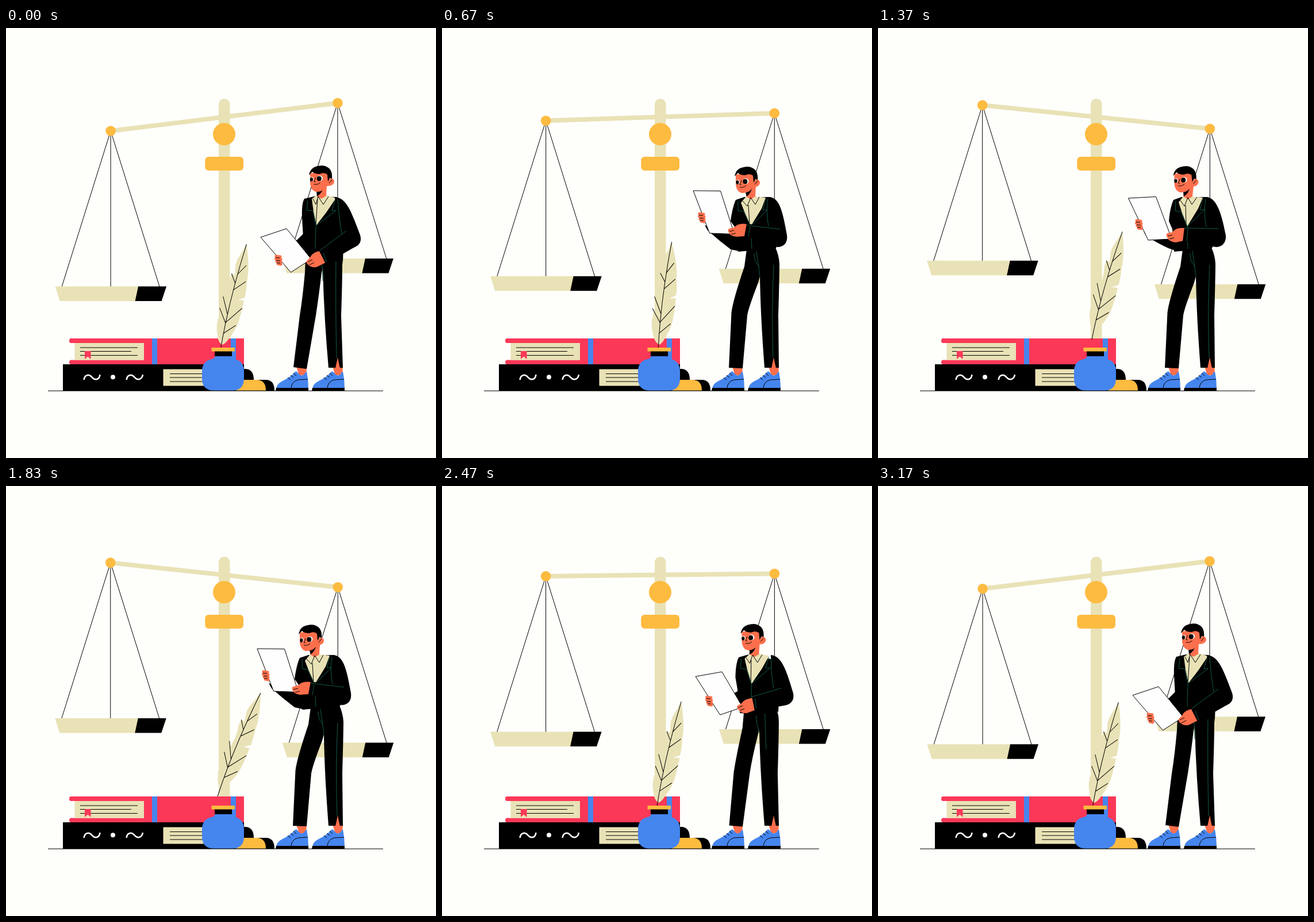
Write an HTML page that moves like this. It is 748 px wide and 748 px high and loops after 3210 ms.

```html
<!DOCTYPE html>
<html lang="en">
<head>
<meta charset="utf-8">
<title>Scales of justice</title>
<style>
html, body { margin: 0; width: 100%; height: 100%; overflow: hidden; background: #fefefb; }
svg { display: block; width: 100vw; height: 100vh; }
.cream { fill: #e9e2b6; }
.gold { fill: #fdbb40; }
.red { fill: #fb3857; }
.blue { fill: #4585ee; }
.skin { fill: #fc6f4c; }
.white { fill: #fefefe; }
.line { fill: none; stroke: #000; stroke-width: 1; }
.seam { fill: none; stroke: #115a48; stroke-width: 1; }
.fingers { fill: none; stroke: #fc6f4c; stroke-width: 5; stroke-linecap: round; }
.sheet { fill: #fefefe; stroke: #000; stroke-width: 1; }
</style>
</head>
<body>
<svg viewBox="0 0 748 748">
  <defs>
    <g id="pan">
      <path class="line" d="M0 0L-85 271M0 0V271M0 0L85 271"/>
      <path class="cream" d="M-96.5 270.5H50L44 296H-88.5Z"/>
      <path d="M48 270.5H97L88.5 296H42.5Z"/>
      <circle class="gold" r="8.8"/>
    </g>
    <g id="shoe">
      <path class="skin" d="M505 589H523L522 603L510 605Z"/>
      <path class="blue" d="M470 627Q471 619 481 614Q494 608 503 598Q505 596 508 600Q513 607 518 603L523 597Q526 612 526 627Z"/>
      <path d="M470 626H526V631H469Z"/>
      <path class="line" d="M496 626Q497 615 508 612L525 611M490 608L495 612M495 604L500 608M500 600L505 605"/>
    </g>
  </defs>

  <path class="line" d="M73 631.2H656"/>
  <rect class="cream" x="370" y="123" width="19.5" height="430" rx="9.7"/>
  <path id="beam" fill="none" stroke="#e9e2b6" stroke-width="8"/>
  <circle class="gold" cx="379.5" cy="184.7" r="19.5"/>
  <rect class="gold" x="346.3" y="224" width="66.7" height="24" rx="6"/>
  <use href="#pan" id="left"/>
  <use href="#pan" id="right"/>

  <!-- books -->
  <path class="red" d="M113 540H414V585H113Q110 585 110 581.5T113 577.5H240V548H113Q110 548 110 544T113 540Z"/>
  <path class="cream" d="M119.5 548H240V577.5H119.5Z"/>
  <path class="blue" d="M254 540h9v45h-9zM391 540h9v45h-9z"/>
  <path class="line" d="M129 556H229M129 562.5H218M129 569.5H229"/>
  <path class="red" d="M137 562H147.500V576L142.200 571.500L137 576Z"/>
  <path d="M99 585H414V593H417Q431 594 431 612H452Q467 612 467 631H99Z"/>
  <path class="cream" d="M273.500 593.500H360V622.500H273.500Z"/>
  <path class="line" d="M285 601.5H345M285 608H345M285 615H345"/>
  <path class="gold" d="M400 612H437Q452 613 452 630.500H400Z"/>
  <path fill="none" stroke="#fefefe" stroke-width="2.6" d="M135.500 612C137 602 145 602 149.500 607.500S162 613 163.500 603M209.500 612C211 602 219 602 223.500 607.500S236 613 238 603"/>
  <circle class="white" cx="186" cy="607.3" r="4"/>

  <g id="feather">
    <path class="cream" d="M0 -195Q16 -155 16 -133Q19 -118 19 -104L8 -97L19 -99Q20 -75 18 -56Q15 -40 9 -28Q5 -17 0 -15Q-8 -18 -11 -28Q-19 -45 -17 -60Q-17 -68 -14 -84Q-10 -100 -11.500 -119Q-15 -128 -13 -140L-7 -138L-10 -156Q-10 -165 -4 -181Z"/>
    <path class="line" d="M0 0Q-7 -85 0 -195M-3 -140L8.400 -159M-3.500 -112L14 -131.500M-3 -54L19 -85M-2 -35L15.500 -53.500M-3.500 -125L-13 -139M-3.500 -69L-18 -97M-3 -53L-19 -76"/>
  </g>

  <!-- ink bottle -->
  <path class="blue" d="M364 570H393Q394 575 398 576Q414 579 414 598V609Q414 630.500 394 630.500H361Q341 630.500 341 609V598Q341 579 358 576Q363 575 364 570Z"/>
  <path d="M363 561H393V571H363Z"/>
  <path class="gold" d="M357.500 556H398V562.500H357.500Z"/>

  <use href="#shoe"/>
  <use href="#shoe" x="63"/>
  <g id="man"></g>
</svg>
<script>
const LOOP = 3210, SWING = 1620, NS = 'http://www.w3.org/2000/svg';
const $ = id => document.getElementById(id);

function add(parent, cls, d, tag = 'path') {
  const el = document.createElementNS(NS, tag);
  if (cls) el.setAttribute('class', cls);
  if (d) el.setAttribute('d', d);
  return parent.appendChild(el);
}

// Poses: 0 paper low, 1 paper raised, 2 glance left, 3 blink, 4 low with a small dip.
// Missing poses fall back to an earlier one.
const BASE = [0, 0, 1, 1, 0];
const parts = [];
const man = $('man');

function shape(cls, ...d) {
  parts.push({ el: add(man, cls), d });
}

function group(...xy) {
  const el = add(man, '', '', 'g');
  parts.push({ el, d: xy.map(p => `translate(${p})`), attr: 'transform' });
  return el;
}

shape('', // trousers
  'M521 400L520 425Q516 470 511 500L500 590L523 593L539 500Q545 460 549 425L551 417Q553 500 561 591L586 591L583 500Q585 440 585 412Q586 405 586 400Z',
  'M530 385L526 415Q506 474 503.500 495L499 591L523 592L531 500Q533 487 550 443L553 432Q554 500 561 591L586 591L585 500Q587 430 587 410Q586 395 580 382Z');
add(man, 'skin', 'M577 573L573 592H581Z');
shape('seam',
  'M549 405Q551 420 551 440M574 402Q573 480 575 574',
  'M543 392Q542 406 552 415M547 388L553 432M577 412Q573 490 576 574');
shape('', // far sleeve
  'M517 358L507 368L503 371L506 374Q512 381 515 384L522 388Z',
  'M515 350L480 352L457 343L462 352Q482 370 502 385L520 389Z',
  'M515 355L485 365L462 354L466 361Q485 374 505 383L520 388Z',
  'M515 355L483 362L461 346L465 355Q485 373 505 383L520 389Z');
shape('', // jacket
  'M536 293L519 297Q514 305 515 330L517 365Q521 400 520 409L586 405L587 380L590 310L575 294Z',
  'M526 294L511 299Q505 312 502 336L512 350L515 389L580 384L584 378L586 312L570 294Z',
  'M528 294L514 299Q508 312 506 336L512 350L515 389L580 384L584 378L586 312L572 294Z',
  'M527 294L513 299Q507 312 505 336L512 350L515 389L580 384L584 378L586 312L571 294Z');
shape('cream', // shirt
  'M532 297L541 291L558 291L574 296L557 321L540 343L535 320Z',
  'M520 304L529 293L546 293L563 295L556 314L537 345L527 322Z',
  'M523 303L531 293L548 293L565 295L557 314L538 345L529 322Z');
shape('skin', // neck
  'M541 276L558 274L557 292L549 297L541 293Z',
  'M530 278L546 274L545 293L537 298L529 293Z',
  'M532 278L549 274L547 293L539 298L531 293Z');
shape('',
  'M540 284Q547 284 552 278Q550 287 541 293Z',
  'M528 286Q535 286 539 279Q537 288 530 293Z',
  'M531 285Q538 285 542 279Q540 288 532 293Z');
shape('line',
  'M534 297L539 307L543 293L552 307L561 293M542 297L539 342',
  'M523 301L531 310L537 295L545 307L552 294M533 308L535 342',
  'M526 300L533 310L539 295L546 307L555 294M535 308L536 342');
shape('seam',
  'M525 300L523 317L534 318L539 343L538 384M573 298L567 318L575 317L540 343',
  'M515 301L515 318L525 319L537 345L539 384M563 297L558 316L566 316L537 345',
  'M518 301L517 318L527 319L538 345L539 384M565 297L560 316L568 316L538 345');

const head = group('18 -2', '0 0', '4.500 -1', '1.500 -0.500');
add(head, 'skin', 'M511 255V269Q511 284 521 287Q532 288 540 277Q553 277 553 268Q551 262 545 264L543 250Z');
add(head, '', 'M509 258Q511 246 521 243Q536 238 545 247Q550 253 549 264L545 263L542 269L541 257Q535 252 528 256Q518 256 515 252Z');
add(head, 'line', 'M544 272L549 266');

const face = group('17.500 -5', '0 0', '4 -2.500', '1 -1');
const eyes = add(face, '', '', 'g');
add(eyes, 'white', 'M511.500 268a3 4 0 1 0 6 0a3 4 0 1 0 -6 0M523.500 266.500a5 4.800 0 1 0 10 0a5 4.800 0 1 0 -10 0');
add(eyes, '', 'M511.300 268.500a2.600 3.400 0 1 0 5.200 0a2.600 3.400 0 1 0 -5.200 0M523.300 267a4 4.200 0 1 0 8 0a4 4.200 0 1 0 -8 0');
const lids = add(face, 'line', 'M512 264Q515 266 518 264M524 264Q529 266 534 262');
add(face, 'line', 'M521 265Q520 270 518 272L521 273M518 277Q525 278 529 274');

shape('sheet',
  'M443 364L488 349L531 402L495.500 425Z',
  'M437 283L484.500 283.500L508.500 358.500L465.500 357Z',
  'M435.500 296L483.500 293.500L511 367L470 369Z',
  'M440 290L487 290.500L512 363L468.500 364Z',
  'M442 366.500L487 351L532 403L496.500 427Z');

const hand = group('474 404', '452 330', '454 342', '454.500 336.500', '473.500 406');
add(hand, 'fingers', 'M-4 -7L3 -6M-4.500 -2.500L4 -1.500M-3 2L4 3M-1 6L4 7');
add(hand, 'line', 'M-5 -4.500L2 -4M-4 0.500L3 1M-3 4.500L3 5');

shape('skin', // near hand
  'M545 388Q532 391 529 399L523 405Q522 410 526 412Q530 417 540 416L556 408Z',
  'M530 341Q515 339 508 347L499 349Q496 352 499 356Q502 363 514 363L527 362Z',
  'M534 348Q519 346 512 355L503 357Q500 360 503 364Q506 372 518 373L531 370Z',
  'M534 346Q519 346 512 353L503 355Q500 358 503 362Q506 370 518 371L531 368Z');
shape('line',
  'M525 407L533 403M528 412L536 408',
  'M500 354L508 352M503 359L511 357',
  'M504 362L512 360M507 367L515 365',
  'M504 360L512 358M507 365L515 363');
shape('', // near sleeve
  'M572 294C592 296 599 315 616 360C620 374 612 379 605 382L556 410L545 388L582 361L576 330Z',
  'M570 294C586 296 592 314 600 360C602 376 592 381 584 381L526 362L530 341L572 343L566 320Z',
  'M572 294C588 296 597 318 605 361C606 376 596 381 588 381L530 371L533 347L574 346L568 322Z',
  'M572 294C588 296 597 318 605 361C606 376 596 381 588 381L530 369L533 346L574 345L568 321Z');
shape('seam',
  'M546 387L592 353M577 298Q579 330 584 358M552 391L558 407',
  'M530 343L588 350M567 297Q563 318 568 345M536 345L533 363',
  'M533 348L592 349M570 297Q566 320 571 346M539 348L537 371');

// time, pose
const POSES = [[0, 0], [130, 0], [640, 1], [950, 1], [1300, 2], [1420, 2], [1780, 1], [1880, 1],
  [2200, 3], [2260, 3], [2660, 4], [2740, 4], [3060, 0], [LOOP, 0]];
// time, quill foot x, y, lean
const QUILL = [[0, 372.2, 565.5, 13.7], [670, 375.8, 565.7, 7], [1370, 372, 542, 15.8],
  [1830, 368, 540, 22.6], [2230, 373.5, 565, 11.9], [2700, 372.2, 565.5, 13.7], [LOOP, 372.2, 565.5, 13.7]];
// time, beam angle
const TILT = [[0, 7], [SWING, -6.8], [2 * SWING, 7]];

const mix = (a, b, k) => a + (b - a) * k;

function span(keys, t) {
  let i = 0;
  while (i < keys.length - 2 && t >= keys[i + 1][0]) i++;
  const a = keys[i], b = keys[i + 1], k = (t - a[0]) / (b[0] - a[0]);
  return [a, b, k * k * (3 - 2 * k)];
}

function valuesAt(keys, t) {
  const [a, b, k] = span(keys, t);
  return a.slice(1).map((v, i) => mix(v, b[i + 1], k));
}

function mixText(a, b, k) {
  const nums = b.match(/-?[\d.]+/g);
  let i = 0;
  return a.replace(/-?[\d.]+/g, n => mix(+n, +nums[i++], k).toFixed(2));
}

const pick = (d, pose) => d[pose] || d[BASE[pose]];

function draw(t) {
  const tilt = valuesAt(TILT, t)[0] * Math.PI / 180;
  const dx = 198.9 * Math.cos(tilt), dy = 198.9 * Math.sin(tilt);
  const ends = [[379.5 - dx, 154.75 + dy], [379.5 + dx, 154.75 - dy]];
  $('beam').setAttribute('d', `M${ends[0]}L${ends[1]}`);
  ['left', 'right'].forEach((id, i) => $(id).setAttribute('transform', `translate(${ends[i]})`));

  const [x, y, lean] = valuesAt(QUILL, t);
  $('feather').setAttribute('transform', `translate(${x} ${y}) rotate(${lean})`);

  const [a, b, k] = span(POSES, t);
  for (const { el, d, attr = 'd' } of parts)
    el.setAttribute(attr, mixText(pick(d, a[1]), pick(d, b[1]), k));

  const open = Math.min(1, Math.max(0, (Math.abs(t - 2230) - 40) / 60));
  eyes.setAttribute('transform', `translate(0 ${266 * (1 - open)}) scale(1 ${open})`);
  lids.style.opacity = open < 0.3 ? 1 : 0;
}

const start = performance.now();
function tick() {
  draw((performance.now() - start) % LOOP);
  requestAnimationFrame(tick);
}
tick();
</script>
</body>
</html>
```
